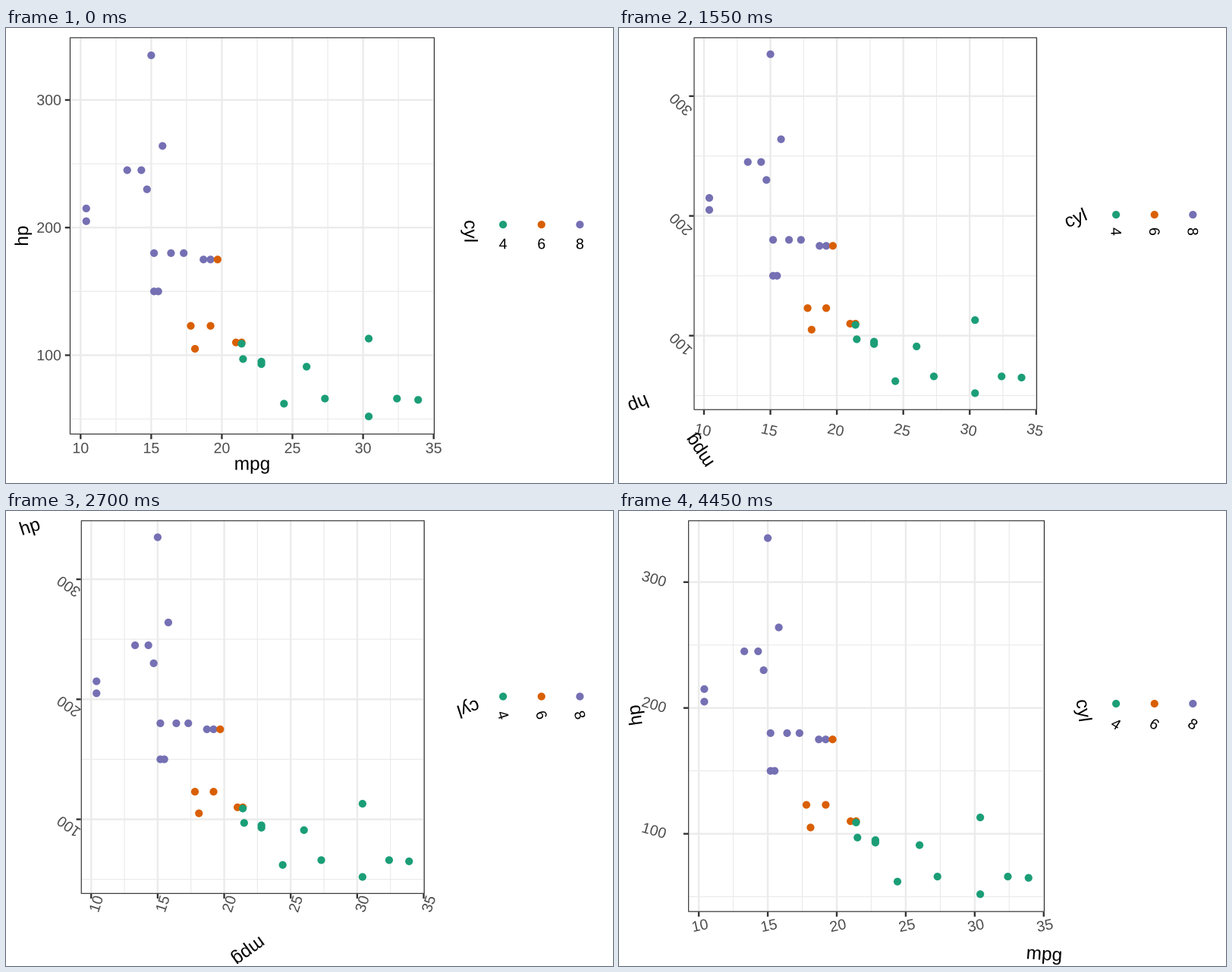
These frames come from a looping animation (800 by 600 pixels, 4500 ms). A matplotlib script:

```python
import math

import matplotlib.pyplot as plt
from matplotlib.animation import FuncAnimation
from matplotlib.patches import PathPatch, Rectangle
from matplotlib.textpath import TextPath
from matplotlib.transforms import Affine2D

W, H, DPI = 800, 600, 100
FRAMES, INTERVAL = 90, 50
PT = 160 / 72            # layout points to pixels
LW = 72 / DPI            # pixels to line width units

HALF = 5.5 * PT          # half a text line
TICK = HALF / 2
TEXT_GAP = 0.4 * HALF
KEY = 17.28 * PT
TITLE, LABEL = 11 * PT, 8.8 * PT
CAP, DESCENT = 0.688, 0.21
THIN, THICK = 1.19, 2.37

GREEN, ORANGE, PURPLE = "#1B9E77", "#D95F02", "#7570B3"
COLORS = {4: GREEN, 6: ORANGE, 8: PURPLE}
MAJOR_X, MINOR_X = range(10, 36, 5), [12.5, 17.5, 22.5, 27.5, 32.5]
MAJOR_Y, MINOR_Y = [100, 200, 300], [50, 150, 250]
POINTS = [
    (21, 110, 6), (22.8, 93, 4), (21.4, 110, 6), (18.7, 175, 8),
    (18.1, 105, 6), (14.3, 245, 8), (24.4, 62, 4), (22.8, 95, 4),
    (19.2, 123, 6), (17.8, 123, 6), (16.4, 180, 8), (17.3, 180, 8),
    (15.2, 180, 8), (10.4, 205, 8), (10.4, 215, 8), (14.7, 230, 8),
    (32.4, 66, 4), (30.4, 52, 4), (33.9, 65, 4), (21.5, 97, 4),
    (15.5, 150, 8), (15.2, 150, 8), (13.3, 245, 8), (19.2, 175, 8),
    (27.3, 66, 4), (26, 91, 4), (30.4, 113, 4), (15.8, 264, 8),
    (19.7, 175, 6), (15, 335, 8), (21.4, 109, 4),
]
ADVANCE = {"m": 0.833, "c": 0.5, "y": 0.5, "l": 0.222}

fig = plt.figure(figsize=(W / DPI, H / DPI), dpi=DPI, facecolor="white")
ax = fig.add_axes([0, 0, 1, 1])
glyphs = {}


def text_width(s, size):
    return size * sum(ADVANCE.get(c, 0.556) for c in s)


def rotated_box(width, size, angle):
    """Width and height of a turned text, descenders included."""
    c, s = abs(math.cos(math.radians(angle))), abs(math.sin(math.radians(angle)))
    height = (CAP + DESCENT) * size
    return width * c + height * s, width * s + height * c


def anchor(angle, hj, vj):
    """Reference point inside the cell, chosen by the quadrant of the angle."""
    return [(hj, vj), (1 - vj, hj), (1 - hj, 1 - vj), (vj, 1 - hj)][int(angle % 360 // 90)]


def put_text(s, size, x, y, angle, hj, vj, color="black"):
    if (s, size) not in glyphs:
        glyphs[s, size] = TextPath((0, 0), s, size=size,
                                   prop={"family": "Liberation Sans"})
    place = (Affine2D().translate(-hj * text_width(s, size), -vj * CAP * size)
             .rotate_deg(angle).scale(1, -1).translate(x, y))
    path = place.transform_path(glyphs[s, size])
    ax.add_patch(PathPatch(path, facecolor=color, linewidth=0, zorder=6))


def lines(kind, at, lo, hi, color, width, z):
    kind(at, lo, hi, colors=color, linewidth=width * LW, zorder=z, snap=False)


def dots(xs, ys, colors):
    ax.scatter(xs, ys, s=(10.2 * LW) ** 2, c=colors, linewidths=0, zorder=4)


def draw(frame):
    ax.cla()
    ax.set_xlim(0, W)
    ax.set_ylim(H, 0)
    ax.axis("off")

    x_text, y_text = -12 * frame, 16 * frame
    x_title, y_title = 4 * frame, 90 - 8 * frame
    key_title, key_text = 270 - 8 * frame, 32 * frame

    # Cell sizes decide where the panel ends.
    xt_w, xt_h = rotated_box(text_width("35", LABEL), LABEL, x_text)
    yt_w, yt_h = rotated_box(text_width("300", LABEL), LABEL, y_text)
    xn_w, xn_h = rotated_box(1.862 * TITLE, TITLE, x_title)
    yn_w, yn_h = rotated_box(text_width("hp", TITLE), TITLE, y_title)
    kt_w, kt_h = rotated_box(text_width("cyl", TITLE), TITLE, key_title)
    kl_w, kl_h = rotated_box(text_width("4", LABEL), LABEL, key_text)

    top = HALF
    bottom = H - HALF - xn_h - TICK - xt_h - TICK
    left = HALF + yn_w + TICK + yt_w + TEXT_GAP + TICK
    keys_left = W - 2 * HALF - 3 * KEY - 2 * HALF
    title_right = keys_left - HALF
    right = title_right - kt_w - 3 * HALF
    width, height = right - left, bottom - top
    middle = (top + bottom) / 2

    def px(v):
        return left + (v - 9.225) / 25.85 * width

    def py(v):
        return bottom - (v - 37.85) / 311.3 * height

    # Panel
    for ticks_x, ticks_y, lw, z in ((MINOR_X, MINOR_Y, THIN, 1),
                                    (MAJOR_X, MAJOR_Y, THICK, 2)):
        lines(ax.hlines, [py(v) for v in ticks_y], left, right, "#EBEBEB", lw, z)
        lines(ax.vlines, [px(v) for v in ticks_x], top, bottom, "#EBEBEB", lw, z)
    dots([px(p[0]) for p in POINTS], [py(p[1]) for p in POINTS],
         [COLORS[p[2]] for p in POINTS])
    ax.add_patch(Rectangle((left + THIN / 2, top + THIN / 2), width - THIN,
                           height - THIN, fill=False, edgecolor="#333333",
                           linewidth=THIN * LW, zorder=5, snap=False))
    lines(ax.vlines, [px(v) for v in MAJOR_X], bottom, bottom + TICK, "#333333", THICK, 5)
    lines(ax.hlines, [py(v) for v in MAJOR_Y], left - TICK, left, "#333333", THICK, 5)

    # Axis labels
    _, v = anchor(x_text, 0.5, 1)
    y = bottom + TICK + (1 - v) * xt_h + v * TEXT_GAP
    for value in MAJOR_X:
        put_text(str(value), LABEL, px(value), y, x_text, 0.5, 1, "#4D4D4D")
    h, _ = anchor(y_text, 1, 0.5)
    x = left - TICK - TEXT_GAP - (1 - h) * yt_w
    for value in MAJOR_Y:
        put_text(str(value), LABEL, x, py(value), y_text, 1, 0.5, "#4D4D4D")

    # Axis titles
    h, v = anchor(x_title, 0.5, 1)
    put_text("mpg", TITLE, left + h * width, H - HALF - v * xn_h, x_title, 0.5, 1)
    h, v = anchor(y_title, 0.5, 1)
    put_text("hp", TITLE, HALF + h * yn_w, bottom - v * height, y_title, 0.5, 1)

    # Legend
    h, v = anchor(key_title, 0, 0.5)
    put_text("cyl", TITLE, title_right - (1 - h) * kt_w,
             middle + (0.5 - v) * kt_h + 1.5 - 7.5 * v, key_title, 0, 0.5)
    key_y = middle - (HALF + kl_h) / 2
    key_x = [keys_left + KEY / 2 + i * (KEY + HALF) for i in range(3)]
    dots(key_x, [key_y] * 3, list(COLORS.values()))
    for x, name in zip(key_x, COLORS):
        put_text(str(name), LABEL, x, key_y + KEY / 2 + kl_h / 2 - 2.7,
                 key_text, 0.5, 0.5)
    return []


anim = FuncAnimation(fig, draw, frames=FRAMES, interval=INTERVAL,
                     init_func=lambda: [], repeat=True, repeat_delay=0)
plt.show()
```
